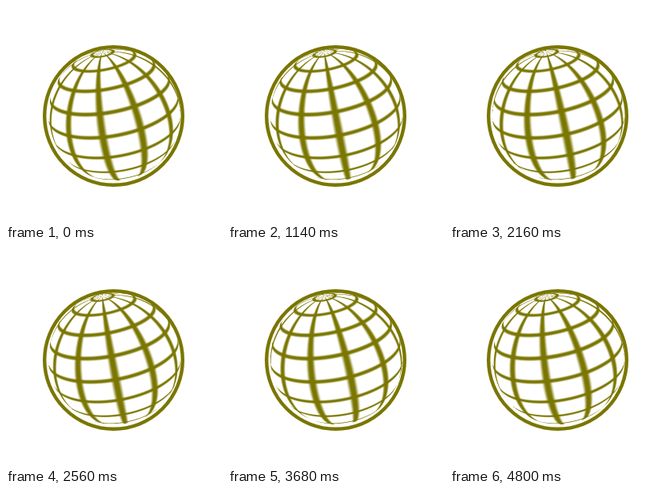
An HTML page with a canvas that plays this animation: 270x270 px, repeating every 4860 ms.

```html
<!DOCTYPE html>
<html lang="en">
<head>
<meta charset="utf-8">
<title>Turning globe</title>
<style>
  html, body { margin: 0; width: 100%; height: 100%; overflow: hidden; background: #fff; }
  canvas { display: block; width: 270px; height: 270px; }
</style>
</head>
<body>
<canvas id="stage" width="270" height="270"></canvas>
<script>
const ctx = document.getElementById('stage').getContext('2d');
const RAD = Math.PI / 180;
const INK = [122, 118, 0];

const LOOP = 4860, STEP = 20, LAST = 240;
const DEGREES_PER_STEP = 1.25;

// The eye distance is in globe radii; r is the outline's radius on screen.
const globe = { x: 135.5, y: 135.5, r: 82.5, eye: 6.5, tilt: 25 * RAD, roll: 11 * RAD };
const ring = { x: 134.5, y: 137.5, r: 86.3, width: 4.4 };
const LON_GAP = 30, LON_START = -12;
const LAT_GAP = 18, LAT_START = 9;
const LEFT = 52, SIZE = 167, SUB = 2;

// Ink strength of a soft line, by distance from its middle.
function softLine(distance, core, edge) {
  const k = Math.min(1, Math.max(0, (edge - distance) / (edge - core)));
  return k * k * (3 - 2 * k);
}

function gridDistance(angle, gap) {
  return Math.abs(angle - gap * Math.round(angle / gap));
}

// Casts a ray from the eye; returns the near hit on the unit sphere.
function hitSphere(dx, dy) {
  const { eye, r } = globe;
  const focal = r * Math.sqrt(eye * eye - 1);
  const a = dx / focal, b = dy / focal;
  const length = 1 + a * a + b * b;
  const inside = eye * eye - length * (eye * eye - 1);
  if (inside <= 0) return null;
  const t = (eye - Math.sqrt(inside)) / length;
  return { x: a * t, y: b * t, z: eye - t };
}

// Every visible sample keeps its pixel, longitude and parallel strength.
function projectSphere() {
  const samples = [];
  const { tilt, roll } = globe;
  for (let j = 0; j < SIZE * SUB; j++) {
    for (let i = 0; i < SIZE * SUB; i++) {
      const hit = hitSphere(LEFT + (i + 0.5) / SUB - globe.x, LEFT + (j + 0.5) / SUB - globe.y);
      if (!hit) continue;
      const across = hit.x * Math.cos(roll) - hit.y * Math.sin(roll);
      const up = -hit.x * Math.sin(roll) - hit.y * Math.cos(roll);
      const north = up * Math.cos(tilt) + hit.z * Math.sin(tilt);
      const toward = hit.z * Math.cos(tilt) - up * Math.sin(tilt);
      const lat = Math.asin(Math.max(-1, Math.min(1, north))) / RAD;
      samples.push({
        pixel: Math.floor(j / SUB) * SIZE + Math.floor(i / SUB),
        lon: Math.atan2(across, toward) / RAD,
        parallel: softLine(gridDistance(lat - LAT_START, LAT_GAP), 0.5, 2.3)
      });
    }
  }
  return samples;
}

const samples = projectSphere();
const image = ctx.createImageData(SIZE, SIZE);
const ink = new Float32Array(SIZE * SIZE);

function draw(step) {
  const turn = LON_START + step * DEGREES_PER_STEP;
  ink.fill(0);
  for (const s of samples) {
    const meridian = softLine(gridDistance(s.lon - turn, LON_GAP), 1, 4.6);
    ink[s.pixel] += 1 - (1 - meridian) * (1 - s.parallel);
  }
  for (let p = 0; p < ink.length; p++) {
    const amount = ink[p] / (SUB * SUB);
    for (let c = 0; c < 3; c++) image.data[p * 4 + c] = 255 + (INK[c] - 255) * amount;
    image.data[p * 4 + 3] = 255;
  }
  ctx.fillStyle = '#fff';
  ctx.fillRect(0, 0, 270, 270);
  ctx.putImageData(image, LEFT, LEFT);
  ctx.strokeStyle = `rgb(${INK})`;
  ctx.lineWidth = ring.width;
  ctx.beginPath();
  ctx.arc(ring.x, ring.y, ring.r, 0, 2 * Math.PI);
  ctx.stroke();
}

const start = performance.now();
let shown = -1;

function tick() {
  const time = (performance.now() - start) % LOOP;
  const step = Math.min(LAST, Math.floor(time / STEP));
  if (step !== shown) draw(shown = step);
  requestAnimationFrame(tick);
}
tick();
</script>
</body>
</html>
```
